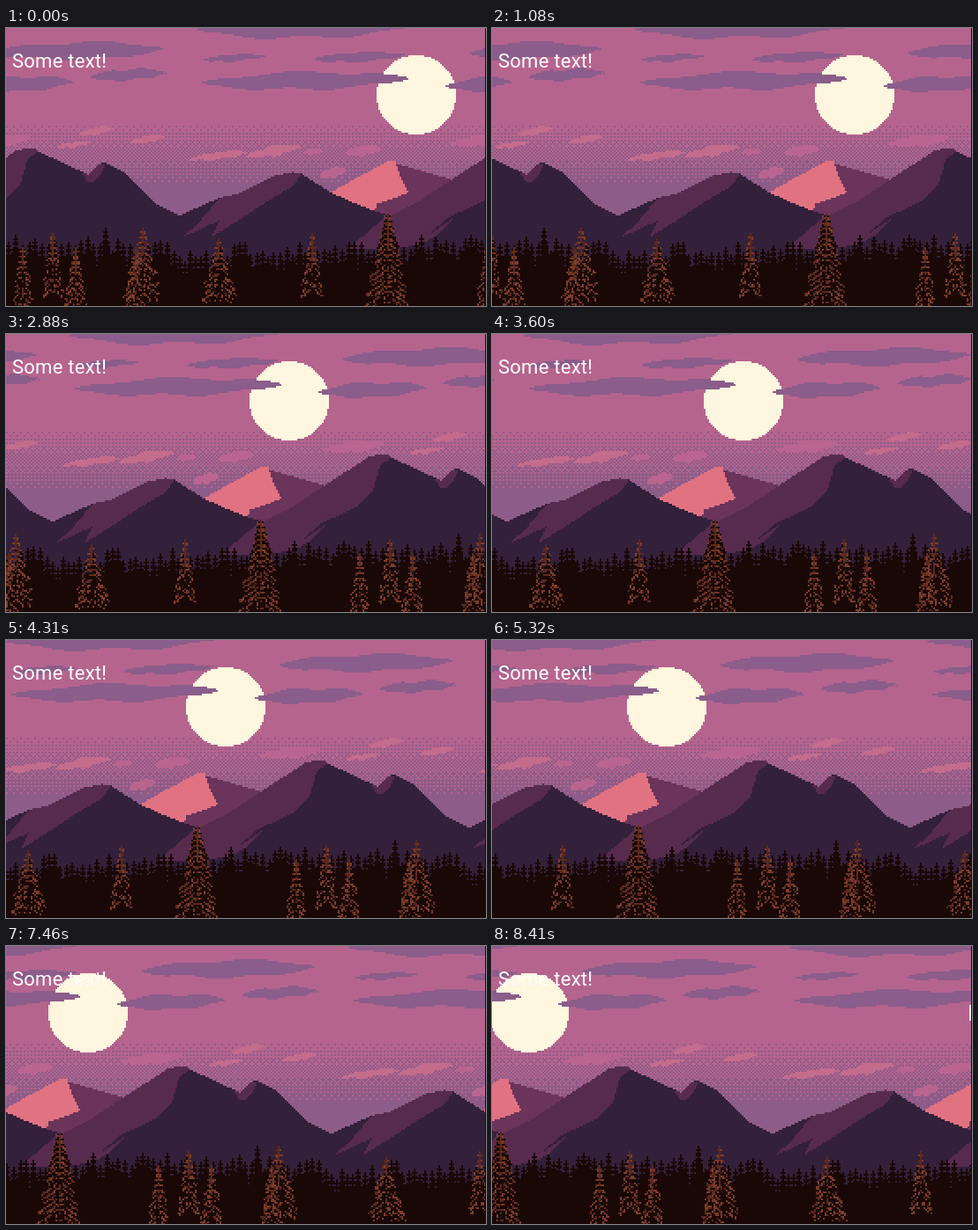
Animation, 544 px wide and 316 px high, one loop 8.51 s. Source, as an HTML page with a canvas:

```html
<!DOCTYPE html>
<html lang="en">
<head>
<meta charset="utf-8">
<title>Drifting dusk</title>
<style>
  html, body { margin: 0; width: 100%; height: 100%; overflow: hidden; background: #1a0807; }
  canvas { position: absolute; left: 0; top: 0; display: block; }
  #label {
    position: absolute; left: 7px; top: 27px;
    font: 400 22px/22px Roboto, Arial, sans-serif;
    letter-spacing: .25px; color: #fff; white-space: nowrap;
  }
</style>
</head>
<body>
<canvas id="stage" width="544" height="316"></canvas>
<div id="label">Some text!</div>
<script>
// The art lives on a grid of 2px cells whose rows begin one pixel above the stage.
const W = 544, H = 316, PX = 2, TW = W / PX, TH = H / PX + 1;
const C = {
  sky: '#b5648e', haze: '#8e5c88', cloud: '#8b5d8a', glow: '#c46c8c', veil: '#b9658f',
  moon: '#fff6df', snow: '#e17282', far: '#6b345a', lit: '#572b4e', dark: '#33203a',
  wood: '#1a0807', bark: '#7d3c29', twig: '#5c2a1e'
};
const col = x => Math.floor(x / PX);
const row = y => Math.round((y + 1) / PX);

let seed = 11;
const rnd = () => (seed = (seed * 16807) % 2147483647) / 2147483647;

function layer(w) {
  const c = document.createElement('canvas');
  c.width = w;
  c.height = TH;
  return c;
}
const tile = layer(TW), trees = layer(500);
let g = tile.getContext('2d');

function dot(color, x, y, w = 1, h = 1) {
  g.fillStyle = color;
  g.fillRect(x, y, w, h);
}

// Same, repeated across the tile seam.
function wrapDot(color, x, y, w, h) {
  for (const shift of [-TW, 0, TW]) dot(color, x + shift, y, w, h);
}

// Hard-edged polygon; the string lists x,y corners in stage pixels.
function poly(color, text) {
  const p = text.split(' ').map(s => s.split(',').map(Number));
  for (let r = 0; r < TH; r++) {
    const y = r * PX + .01, xs = [];
    p.forEach(([x1, y1], i) => {
      const [x2, y2] = p[(i + 1) % p.length];
      if ((y1 <= y) !== (y2 <= y)) xs.push(Math.round((x1 + (y - y1) / (y2 - y1) * (x2 - x1)) / PX));
    });
    xs.sort((a, b) => a - b);
    for (let i = 0; i + 1 < xs.length; i += 2) wrapDot(color, xs[i], r, xs[i + 1] - xs[i], 1);
  }
}

function sky() {
  const pair = (x, y) => ((x ^ y) & 1) * 2 + (y & 1);
  dot(C.sky, 0, 0, TW, TH);
  for (let y = row(108); y < TH; y++)
    for (let x = 0; x < TW; x++) {
      const limit = (4 * pair(x, y) + pair(x >> 1, y >> 1) + .5) / 16;
      if (.06 + (y - row(108)) / 38 > limit) dot(C.haze, x, y);
    }
}

function moon() {
  const r = 22.5;
  for (let i = 0; i < 45; i++) {
    const k = Math.round(Math.sqrt(r * r - (i + .5 - r) ** 2) - .5);
    dot(C.moon, 232 - k, row(31) + i, k * 2 + 1);
  }
}

// Lumpy lens inside the given box; rise lifts its right end.
function cloud(color, x, y, w, h, rise) {
  const phase = rnd() * 6;
  for (let i = 0; i < w / PX; i++) {
    const u = (i + .5) * PX / w;
    const swell = (h - rise) / 2 * Math.sin(Math.PI * u) ** .6;
    const mid = y + h / 2 + rise * (.5 - u);
    const lump = 1 - .17 * (1 + Math.sin(u * 13 + phase));
    const base = 1 - .17 * (1 + Math.sin(u * 16 - phase));
    const top = row(mid - swell * lump);
    wrapDot(C[color], col(x) + i, top, 1, Math.max(1, row(mid + swell * base) - top));
  }
}

function clouds() {
  const drifts = [[217, -18, 247, 34], [526, 12, 195, 28], [97, 43, 85, 20], [498, 51, 122, 25],
    [222, 46, 234, 28], [225, 27, 70, 14], [350, 24, 102, 18]];
  const wisps = [[85, 108, 38, 18], [58, 126, 38, 13], [140, 118, 39, 17], [209, 136, 66, 18], [272, 128, 61, 24]];
  const veils = [[336, 135, 24, 11], [384, 130, 41, 19], [356, 155, 29, 19], [505, 117, 69, 22]];
  for (const d of drifts) cloud('cloud', ...d, 5);
  for (const d of wisps) cloud('glow', ...d, d[3] * .45);
  for (const d of veils) cloud('veil', ...d, d[3] * .3);
}

function mountains() {
  poly(C.far, '400,252 400,180 434,151 441,154 504,172 540,200 500,252');
  poly(C.snow, '350,197 368,187 396,171 434,151 441,152 447,170 456,187 438,194 420,200 418,212');
  // middle ridge
  poly(C.dark, '190,260 195,214 242,193 265,188 305,168 325,164 335,166 368,187 395,199 418,208 430,212 400,260');
  poly(C.lit, '242,193 265,188 305,168 325,164 335,166 325,180 298,196 268,216 232,238 242,219 200,238 218,222');
  // twin peaks, crossing the seam
  poly(C.lit, '382,256 426,218 470,196 504,173 556,139 574,136 584,142 560,256');
  poly(C.dark, '400,256 470,246 490,235 508,216 480,234 500,216 541,197 560,178 568,150 580,140 638,167 648,155 656,153 677,163 696,182 714,200 739,213 750,256');
  poly(C.lit, '629,164 638,167 648,155 658,154 652,165 643,176 636,174');
  dot(C.dark, 0, row(250), TW, TH);
}

// Treeline: a gentle wave with a dip under the valley.
const treeline = x => 245 - 5 * Math.cos(2 * Math.PI * x / W) + 10 * Math.exp(-(((x - 207) / 20) ** 2));

function spire(x, top) {
  for (let y = top; y < TH; y++) {
    const r = y - top;
    const half = r < 2 ? 0 : Math.min(2, (r >> 3) + (r % 3 ? 1 : 0));
    wrapDot(C.wood, x - half, y, half * 2 + 1, 1);
  }
}

function forest() {
  for (let x = 0; x < TW; x++) dot(C.wood, x, row(treeline(x * PX) + 18 + rnd() * 14), 1, TH);
  for (let x = 1; x < TW; x += 3 + Math.floor(rnd() * 2))
    spire(x, row(treeline(x * PX) - 7 + rnd() * 16));
  spire(col(112), row(226));
}

// Bare conifer: thin trunk, drooping branches that thin out near the middle.
function conifer(cx, top, height, half, step, shade) {
  const x = col(cx - 1), y0 = row(top), h = height / PX, w = half / PX;
  const reach = r => w * (r / h) ** .75;
  for (let r = 0; r < h; r++) {
    const s = shade ? Math.round(reach(r) * .75) : 0;
    dot(C.wood, x - s, y0 + r, s * 2 + 1);
    if (rnd() < 1.1 - r / h) dot(C.twig, x, y0 + r);
  }
  for (let r = 1; r < h - 2; r += step)
    for (const side of [-1, 1]) {
      const len = Math.max(1, Math.round(reach(r) * (.75 + rnd() * .45)));
      for (let d = 1; d <= len; d++) {
        const y = r + Math.round(d * .7);
        const keep = r < h * .4 ? .95 : .45 + .5 * d / len;
        if (y < h && rnd() < keep)
          dot(rnd() < (shade ? .35 : .6) ? C.bark : C.twig, x + side * d, y0 + y, 1, rnd() < .4 ? 2 : 1);
      }
    }
}

// Trees return one tile later, spread a little differently.
function plant(xs, ...shape) {
  for (const x of xs)
    for (const at of [x, x + W + (x < 200 ? -18 : 18)]) conifer(at, ...shape);
}

sky();
moon();
clouds();
mountains();
forest();

g = trees.getContext('2d');
plant([19, 79, 147], 248, 68, 13, 3);
plant([53, 347], 233, 72, 13, 3);
plant([155], 227, 82, 23, 3);
plant([242], 239, 74, 23, 3);
plant([433], 210, 106, 28, 3, true);

// Steps last 60ms, apart from a few that are 10ms shorter.
const STEPS = 142, LOOP = 8510, SHORT = [60, 83, 124, 128, 132];
const startOf = i => i * 60 - 10 * SHORT.filter(s => s < i).length;

const view = document.getElementById('stage').getContext('2d');
view.imageSmoothingEnabled = false;

function draw(now) {
  const t = now % LOOP;
  let step = STEPS - 1;
  while (startOf(step) > t) step--;
  const x = -3 * step;
  for (const [art, at] of [[tile, x], [tile, x + W], [trees, x]])
    view.drawImage(art, at, -1, art.width * PX, TH * PX);
  view.fillStyle = '#1a0a12';
  view.fillRect(W - 1, 0, 1, H);
}

const born = performance.now();
function tick() {
  draw(performance.now() - born);
  requestAnimationFrame(tick);
}
tick();
</script>
</body>
</html>
```
